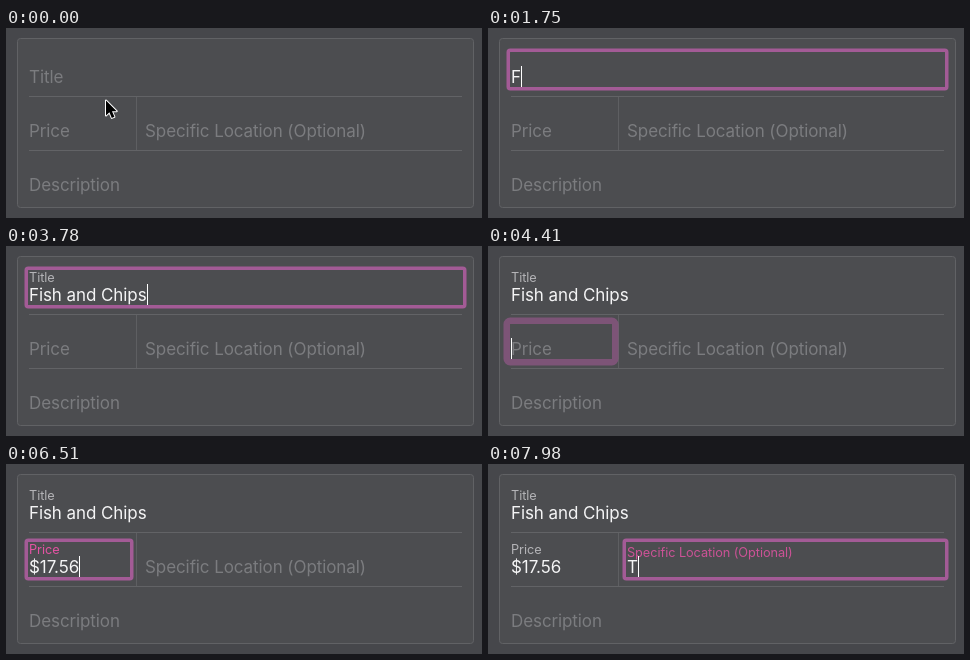
An HTML page with a canvas for the animation above (8000 ms loop, 476 by 190 pixels).

```html
<!DOCTYPE html>
<html lang="en">
<head>
<meta charset="utf-8">
<title>Floating label form</title>
<style>
  html, body { margin: 0; width: 100%; height: 100%; overflow: hidden; background: #46474b; }
  canvas { display: block; width: 476px; height: 190px; }
</style>
</head>
<body>
<canvas id="stage"></canvas>
<script>
const LOOP = 8000, TICK = 70, FLOAT_MS = 350, RING_MS = 140;
const FONT = 'Inter, "Open Sans", sans-serif';
const WHITE = '#f4f4f5', HINT = '#7b7c7f', LABEL = '#b4b4b7', PINK = '#e353a3', RING = '#a35b96';

// keys: the moment each character of value is typed
const fields = [
  { hint: 'Title', x: 23, baseline: 55, box: [18.5, 20.5, 460.5, 62.5],
    focus: 560, ringAt: 490, spread: 0, caretOff: 1190, blur: 4200, accent: LABEL,
    value: 'Fish and Chips',
    keys: [1750, 1890, 2030, 2100, 2310, 2520, 2660, 2800, 2940, 3290, 3500, 3570, 3640, 3780] },
  { hint: 'Price', x: 23, baseline: 109, box: [18.5, 74.5, 127.5, 116.5],
    focus: 4200, ringAt: 4340, spread: 8, caretOff: 4760, blur: 7000, accent: PINK,
    value: '$17.56', keys: [5390, 5810, 5880, 6090, 6440, 6510] },
  { hint: 'Specific Location (Optional)', x: 139, baseline: 109, box: [134.5, 74.5, 460.5, 116.5],
    focus: 7000, ringAt: 7140, spread: 4.5, caretOff: 7560, blur: LOOP, accent: PINK,
    value: 'T', keys: [7770] },
  { hint: 'Description', x: 23, baseline: 163, value: '', keys: [] }
];

const canvas = document.getElementById('stage');
const ctx = canvas.getContext('2d');
const ratio = window.devicePixelRatio || 1;
canvas.width = 476 * ratio;
canvas.height = 190 * ratio;
ctx.scale(ratio, ratio);

const clamp = v => Math.max(0, Math.min(1, v));

function text(string, x, y, size, color, alpha = 1) {
  ctx.font = `${size}px ${FONT}`;
  ctx.letterSpacing = '-0.005em';
  ctx.globalAlpha = alpha;
  ctx.fillStyle = color;
  ctx.fillText(string, x, y);
  ctx.globalAlpha = 1;
}

function rect(x, y, w, h, color) {
  ctx.fillStyle = color;
  ctx.fillRect(x, y, w, h);
}

function drawCard() {
  rect(0, 0, 476, 190, '#46474b');
  ctx.beginPath();
  ctx.roundRect(11.5, 10.5, 456, 169, 3);
  ctx.fillStyle = '#4c4d50';
  ctx.fill();
  ctx.strokeStyle = '#616265';
  ctx.lineWidth = 1;
  ctx.stroke();
  rect(23, 68, 433, 1, '#626366');
  rect(23, 122, 433, 1, '#626366');
  rect(130, 69, 1, 53, '#5e5f62');
}

// The ring shrinks onto the field while its inner edge stays in place.
function drawRing(field, t) {
  if (!(t >= field.ringAt && t < field.blur)) return;
  const left = 1 - clamp((t - field.ringAt) / RING_MS);
  const spread = field.spread * left ** 1.4;
  const width = 3.5 + spread;
  const inset = width / 2 - spread;
  const [x0, y0, x1, y1] = field.box;
  ctx.beginPath();
  ctx.roundRect(x0 + inset, y0 + inset, x1 - x0 - 2 * inset, y1 - y0 - 2 * inset, 2 + spread / 2);
  ctx.globalAlpha = 1 / (1 + spread / 4);
  ctx.strokeStyle = RING;
  ctx.lineWidth = width;
  ctx.stroke();
  ctx.globalAlpha = 1;
}

function drawField(field, t) {
  const { hint, x, baseline, keys } = field;
  const typed = field.value.slice(0, keys.filter(k => k <= t).length);
  const focused = t >= field.focus && t < field.blur;
  drawRing(field, t);
  if (typed) {
    const p = clamp((t - keys[0]) / FLOAT_MS);
    const y = baseline - 19 + 19 * (1 - p) ** 2;
    text(hint, x, y, 12.75, focused ? field.accent : LABEL, 1 - (1 - p) ** 2);
    text(typed, x, baseline, 17, WHITE);
  } else {
    text(hint, x, baseline, 17, HINT);
  }
  if (focused && (typed || t < field.caretOff)) {
    ctx.font = `17px ${FONT}`;
    const end = typed ? ctx.measureText(typed).width : 0;
    rect(Math.round(x + end), baseline - 17, 1, 21, '#fff');
  }
}

function drawPointer(t) {
  if (t >= 490) return;
  const p = clamp(t / 420);
  const rise = p * p * (3 - 2 * p);
  ctx.save();
  ctx.translate(100 - 8 * rise, 72.5 - 24 * rise);
  ctx.beginPath();
  [[0, 0], [0, 15], [3.4, 11.8], [5.8, 17.4], [8.4, 16.3], [6, 10.8], [10.7, 10.8]]
    .forEach(([x, y]) => ctx.lineTo(x, y));
  ctx.closePath();
  ctx.lineJoin = 'round';
  ctx.lineWidth = 2;
  ctx.strokeStyle = '#fff';
  ctx.stroke();
  ctx.fillStyle = '#000';
  ctx.fill();
  ctx.restore();
}

const start = performance.now();

function frame() {
  const elapsed = (performance.now() - start) % LOOP;
  const t = Math.floor(elapsed / TICK) * TICK;
  drawCard();
  fields.forEach(field => drawField(field, t));
  drawPointer(t);
  requestAnimationFrame(frame);
}
frame();
</script>
</body>
</html>
```
